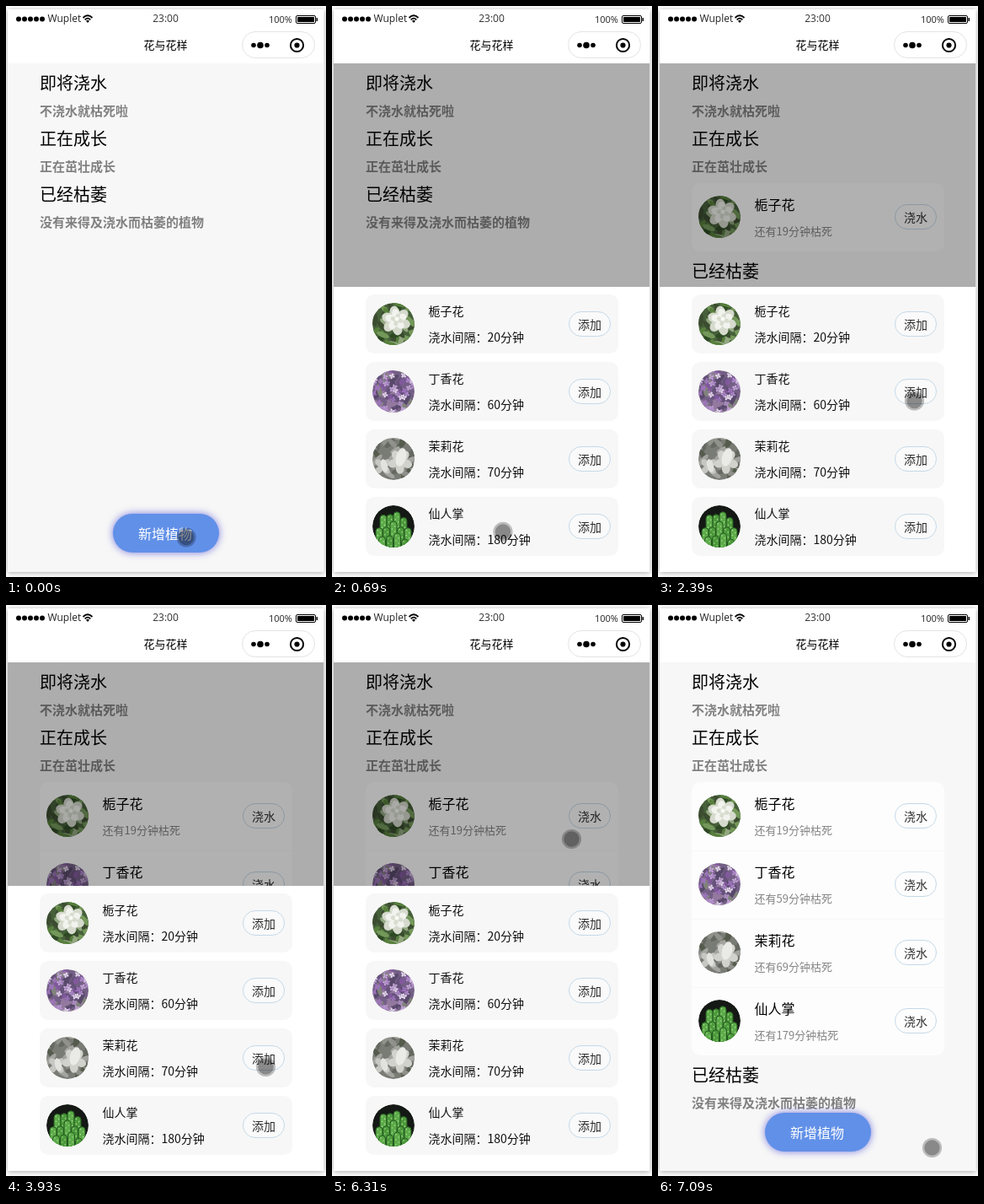
These frames come from a looping animation (380x677 px, 7.17 s). An HTML page:

```html
<!DOCTYPE html>
<html lang="zh-CN">
<head>
<meta charset="utf-8">
<title>花与花样</title>
<style>
  html, body { margin: 0; width: 100%; height: 100%; overflow: hidden; background: #fff; }
  svg { display: block; width: 380px; height: 677px; }
  text { font-family: "Noto Sans CJK SC", "Noto Sans CJK", "Noto Sans", sans-serif; }
  .latin { font-family: "Open Sans", "Noto Sans", sans-serif; }
  .phone { filter: drop-shadow(0 1px 3px rgba(0, 0, 0, .34)); }
  .add { filter: drop-shadow(0 0 5px rgba(90, 90, 215, .8)); }
</style>
</head>
<body>
<svg id="stage" viewBox="0 0 380 677" xmlns="http://www.w3.org/2000/svg"></svg>
<script>
const LOOP = 7170;
const OPEN = 385, CLOSE = 6390;
const PANEL_TOP = 333, PANEL_H = 338, ROW = 81;
const PRESS_LEAD = 235, PRESS_MS = 80;

const PLANTS = [
  { name: '栀子花', mins: 20, added: 1610, draw: gardenia },
  { name: '丁香花', mins: 60, added: 2930, draw: lilac },
  { name: '茉莉花', mins: 70, added: 4240, draw: jasmine },
  { name: '仙人掌', mins: 180, added: 5405, draw: cactus }
];

const smooth = k => k * k * (3 - 2 * k);
const easeOut = k => 1 - (1 - k) ** 3;

// Pointer moves between taps; bow bends the path sideways
const HOME = { x: 214, y: 630 };
const MOVES = [
  { from: 79, to: 80, x: 202.5, y: 624.5 },
  { from: 690, to: 1340, x: 306, y: 383, ease: easeOut },
  { from: 1690, to: 2330, x: 304.5, y: 468 },
  { from: 2930, to: 3650, x: 308.5, y: 547.5 },
  { from: 4090, to: 4540, x: 309, y: 615.5 },
  { from: 5340, to: 6000, x: 284.5, y: 277.5, bow: 22 },
  { from: 6570, to: 7090, x: 325.5, y: 643.5, bow: -20 }
];

const $ = id => document.getElementById(id);
const clamp = v => Math.max(0, Math.min(1, v));

// y is the middle of the glyphs
function label(x, y, size, str, attrs = '') {
  return `<text x="${x}" y="${(y + size * 0.36).toFixed(2)}" font-size="${size}" ${attrs}>${str}</text>`;
}
const rect = (x, y, w, h, r, attrs = '') =>
  `<rect x="${x}" y="${y}" width="${w}" height="${h}" rx="${r}" ${attrs}/>`;
const circle = (x, y, r, attrs = '') => `<circle cx="${x}" cy="${y}" r="${r}" ${attrs}/>`;
const oval = (x, y, rx, ry, turn, fill) =>
  `<ellipse rx="${rx}" ry="${ry}" fill="${fill}" transform="translate(${x.toFixed(1)} ${y.toFixed(1)}) rotate(${turn.toFixed()})"/>`;
const repeat = (n, make) => Array.from({ length: n }, (_, i) => make(i)).join('');

function seeded(seed) {
  return () => (seed = seed * 16807 % 2147483647) / 2147483647;
}

const back = fill => circle(0, 0, 25, `fill="${fill}"`);

function leaves(seed, colors) {
  const rnd = seeded(seed);
  return repeat(34, i => oval(rnd() * 52 - 26, rnd() * 52 - 26, 8, 3, rnd() * 180, colors[i % colors.length]));
}

// A ring of n petals of length r around a point
function bloom(x, y, n, r, start, fill) {
  return repeat(n, i => {
    const deg = start + i * 360 / n, a = deg * Math.PI / 180;
    return oval(x + r * Math.cos(a), y + r * Math.sin(a), r * 0.85, r * 0.62, deg, fill);
  });
}

function gardenia() {
  return back('#46603a') + leaves(71, ['#2e4a24', '#577f3c', '#74985a', '#3c4c30', '#93a880']) +
    bloom(3, -4, 6, 9.5, 20, '#d5dacd') + bloom(3, -5, 5, 7, 50, '#f2f3ee') +
    bloom(4, -5, 4, 4, 15, '#d8dccf') + circle(4, -6, 2.5, 'fill="#fafaf5"');
}

function lilac() {
  const rnd = seeded(2024), colors = ['#9c74bb', '#c3a5d6', '#e4d7ec', '#83599f', '#ae8cc9'];
  return back('#745f86') + leaves(9, ['#58496b', '#80837a', '#94799f', '#66527a']) +
    repeat(56, i => bloom(rnd() * 50 - 25, rnd() * 50 - 25, 4, 1.9, rnd() * 90, colors[i % 5]));
}

function jasmine() {
  return back('#797b75') + leaves(33, ['#656860', '#90918b', '#555c4d', '#a3a39f']) +
    bloom(-13, 9, 4, 6, 45, '#c6c6c2') + bloom(8, 3, 5, 8, 20, '#d2d2cd') +
    oval(9, -2, 6, 11, 15, '#eaeae6') + oval(-11, 8, 4, 8, -15, '#e2e2de');
}

function cactus() {
  const stem = (x, y, i) =>
    rect(x - 4, y, 8, 45, 4, `fill="${i % 2 ? '#4c9a3b' : '#5cab49'}" stroke="#245a20"`) +
    repeat(7, k => circle(x + (k % 2 ? 1.6 : -1.6), y + 3 + k * 3, 0.8, 'fill="#a9d893"'));
  const row = (n, gap, top) => repeat(n, i => {
    const x = (i - (n - 1) / 2) * gap;
    return stem(x, top + Math.abs(x) * 0.45 + i % 2 * 3, i);
  });
  return back('#151915') + row(4, 8, -19) + row(5, 8.5, -6) + row(4, 9, 6);
}

const photo = (i, y) => `<use href="#plant${i}" x="73" y="${y}"/>`;
const pill = (y, str, id = '') => `<g ${id && `id="${id}"`}>` +
  rect(281.5, y - 14.5, 49, 29, 14.5, 'fill="#fdfdfd" fill-opacity=".6" stroke="#c5d9e8"') +
  label(306, y + 1, 14, str, 'text-anchor="middle" fill="#2c2c2c"') + '</g>';

const heading = (y, str) => label(40, y, 20, str);
const note = (y, str) => label(40, y, 15, str, 'font-weight="700" fill="#808080"');

function listRow({ name, mins }, i) {
  const y = 210 + i * ROW;
  return `<g id="row${i}">` +
    (i ? `<path d="M40 ${y + 0.5}H340" stroke="#f7f7f7"/>` : '') +
    photo(i, y + 40) + label(114.5, y + 26, 16, name) +
    label(114.5, y + 57, 13, `还有${mins - 1}分钟枯死`, 'fill="#858585"') +
    pill(y + 40, '浇水') + '</g>';
}

function panelRow({ name, mins }, i) {
  const y = 342 + i * 80;
  return rect(40, y, 300, 70, 10, 'fill="#f7f7f7"') + photo(i, y + 35) +
    label(114.5, y + 20, 14, name, 'fill="#111"') +
    label(114.5, y + 51, 14, `浇水间隔：${mins}分钟`, 'fill="#111"') +
    pill(y + 35, '添加', 'pick' + i);
}

function header() {
  return repeat(5, i => circle(15 + i * 7, 15.5, 3)) +
    label(49.5, 15, 12, 'Wuplet', 'class="latin" fill="#222"') +
    '<g fill="none" stroke="#000" stroke-width="1.8"><path d="M91.5 14Q97 8.5 102.5 14"/><path d="M93.7 16.4Q97 13 100.3 16.4"/></g>' +
    '<path d="M95 17.7Q97 16 99 17.7L97 20Z"/>' +
    label(189.5, 15, 12, '23:00', 'class="latin" text-anchor="middle" fill="#333"') +
    label(312, 16, 11, '100%', 'class="latin" fill="#222"') +
    rect(344.5, 11.5, 23, 9, 1.5, 'fill="none" stroke="#000"') + rect(346, 13, 20, 6, 0.5) +
    rect(368.5, 14, 1.5, 4, 0.5) +
    label(189.5, 46, 13, '花与花样', 'text-anchor="middle"') +
    rect(280.5, 30.5, 86, 31, 15.5, 'fill="#fff" stroke="#e4e4e4"') +
    repeat(3, i => circle(294 + i * 8, 46.5, i === 1 ? 3.8 : 2.8)) +
    circle(345.5, 46.5, 7.6, 'fill="none" stroke="#000" stroke-width="2"') + circle(345.5, 46.5, 3.1);
}

$('stage').innerHTML =
  '<defs><clipPath id="disc"><circle r="25"/></clipPath>' +
  '<clipPath id="page"><rect x="2" y="68" width="375.5" height="603"/></clipPath>' +
  PLANTS.map((p, i) => `<g id="plant${i}" clip-path="url(#disc)">${p.draw()}</g>`).join('') + '</defs>' +
  rect(2, 4, 375.5, 667, 0, 'fill="#fff" class="phone"') +
  '<g clip-path="url(#page)">' + rect(2, 68, 375.5, 603, 0, 'fill="#f7f7f7"') +
  heading(92, '即将浇水') + note(125, '不浇水就枯死啦') +
  heading(158, '正在成长') + note(191, '正在茁壮成长') +
  rect(40, 210, 300, 0, 10, 'id="list" fill="#fdfdfd"') + PLANTS.map(listRow).join('') +
  '<g id="dead">' + heading(224, '已经枯萎') + note(257, '没有来得及浇水而枯萎的植物') + '</g>' +
  '<g id="create">' + rect(127, 602, 126, 46, 23, 'fill="#6190e8" class="add"') +
  label(189, 626, 16, '新增植物', 'text-anchor="middle" fill="#fff" font-weight="500"') + '</g>' +
  rect(2, 68, 375.5, 603, 0, 'id="mask"') +
  '<g id="panel">' + rect(2, PANEL_TOP, 375.5, PANEL_H, 0, 'fill="#fff"') +
  PLANTS.map(panelRow).join('') + '</g></g>' + header() +
  '<g id="pointer">' + circle(0, 0, 11.6, 'fill-opacity=".24"') + circle(0, 0, 9.2, 'fill-opacity=".27"') + '</g>';

// CSS-style cubic Bézier easing, solved by bisection
function bezier(x1, y1, x2, y2) {
  const at = (a, b, s) => 3 * a * s * (1 - s) ** 2 + 3 * b * s * s * (1 - s) + s ** 3;
  return x => {
    if (x <= 0 || x >= 1) return clamp(x);
    let lo = 0, hi = 1;
    for (let i = 0; i < 24; i++) {
      const mid = (lo + hi) / 2;
      if (at(x1, x2, mid) < x) lo = mid; else hi = mid;
    }
    return at(y1, y2, lo);
  };
}
const slide = bezier(.36, .66, .04, 1);
const fade = bezier(.42, 0, 1, 1);

// Progress of the sheet: eases to 1 on opening and back to 0 on closing
const sheet = (t, ease, ms) => t < CLOSE ? ease((t - OPEN) / ms) : 1 - ease((t - CLOSE) / ms);

function pointerAt(t) {
  let { x, y } = HOME;
  for (const m of MOVES) {
    const k = (m.ease || smooth)(clamp((t - m.from) / (m.to - m.from)));
    x += (m.x - x) * k + (m.bow || 0) * Math.sin(Math.PI * k);
    y += (m.y - y) * k;
  }
  return [x, y];
}

// Opacity of a button whose tap takes effect at the given time
function pressFade(t, tap, lead) {
  const since = t - (tap - lead);
  return since >= 0 && since < PRESS_MS ? 0.6 : 1;
}

function render(t) {
  const count = PLANTS.filter(p => t >= p.added).length;
  PLANTS.forEach((p, i) => {
    $('row' + i).style.display = i < count ? '' : 'none';
    $('pick' + i).setAttribute('opacity', pressFade(t, p.added, PRESS_LEAD));
  });
  $('list').setAttribute('height', count * ROW);
  $('dead').setAttribute('transform', `translate(0 ${count ? count * ROW + 10 : 0})`);
  $('create').setAttribute('opacity', pressFade(t, OPEN, PRESS_MS));
  $('mask').setAttribute('opacity', 0.3 * sheet(t, fade, 150));
  $('panel').setAttribute('transform', `translate(0 ${PANEL_H * (1 - sheet(t, slide, 300))})`);
  $('pointer').setAttribute('transform', `translate(${pointerAt(t)})`);
}

const began = performance.now();
function tick() {
  render((performance.now() - began) % LOOP);
  requestAnimationFrame(tick);
}
tick();
</script>
</body>
</html>
```
